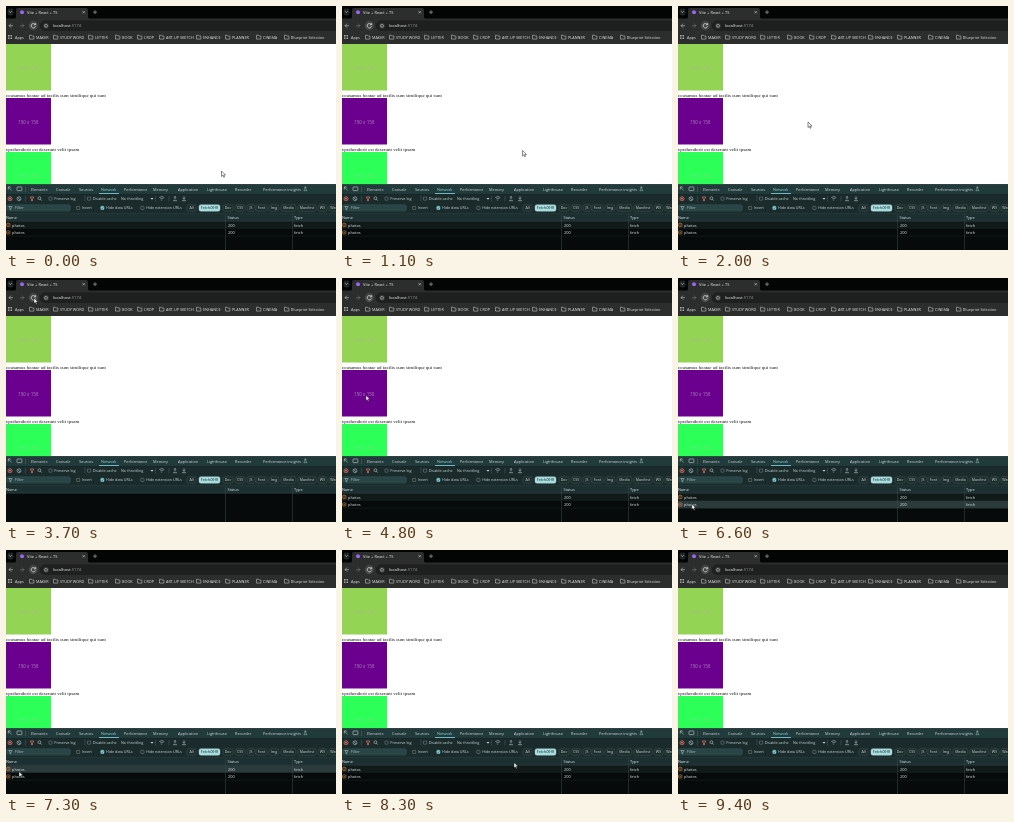
An HTML page that plays this animation: 330x244 px, repeating every 9500 ms.

```html
<!DOCTYPE html>
<html lang="en">
<head>
<meta charset="utf-8">
<title>Network panel</title>
<style>
html, body { margin: 0; width: 100%; height: 100%; overflow: hidden; background: #050808; }
svg { display: block; width: 330px; height: 244px; }
text { font-family: "Open Sans", "Noto Sans", sans-serif; white-space: pre; }
.serif { font-family: "Liberation Serif", serif; }
</style>
</head>
<body>
<svg id="stage" viewBox="0 0 330 244"></svg>
<script>
const NS = "http://www.w3.org/2000/svg";
const stage = document.getElementById("stage");
const LOOP = 9500, STEP = 100;

function add(tag, attrs, parent = stage) {
  const el = document.createElementNS(NS, tag);
  for (const k in attrs) el.setAttribute(k, attrs[k]);
  parent.appendChild(el);
  return el;
}
const rect = (x, y, width, height, fill, rx = 0, more = {}, p) =>
  add("rect", { x, y, width, height, fill, rx, ...more }, p);
const line = (d, stroke, w = 0.6, p) =>
  add("path", { d, stroke, "stroke-width": w, fill: "none" }, p);
const circle = (cx, cy, r, fill, more = {}) => add("circle", { cx, cy, r, fill, ...more });
function label(x, y, str, fill = "#dfe5e5", size = 3.9, more = {}, p = stage) {
  const el = add("text", { x, y, fill, "font-size": size, ...more }, p);
  el.textContent = str;
  return el;
}

function drawBrowser() {
  rect(0, 0, 330, 13, "#030505");
  rect(1.5, 2.5, 6, 7, "#202323", 2);
  line("M3.2 5.2l1.3 1.4 1.3-1.4", "#ddd");
  add("path", { d: "M8 13q2 0 2-2V4q0-2 2-2h68q2 0 2 2v7q0 2 2 2z", fill: "#2c2d2d" });
  circle(16, 6.3, 2, "#9a63f5");
  label(21, 7.9, "Vite + React + TS", "#eee", 4);
  line("M76.4 4.9l2.6 2.6m0-2.6l-2.6 2.6M87 6.2h4m-2-2v4", "#ccc", 0.55);

  rect(0, 12.5, 330, 25.5, "#2c2d2d");
  line("M7 19.7H3m2-2l-2 2 2 2", "#c8c8c8");
  line("M14 19.7h4m-2-2l2 2-2 2", "#777");
  circle(27.3, 19.7, 4.6, "#454747");
  line("M29.3 18.6a2.2 2.2 0 1 0 .2 1.8M29.6 17v1.8h-1.8", "#eee", 0.65);
  rect(34, 14.6, 300, 10.4, "#1e1f1f", 5);
  circle(40, 19.8, 2.9, "#363838");
  circle(40, 19.8, 1.5, "none", { stroke: "#ccc", "stroke-width": 0.5 });
  line("M40 19.6v1", "#ccc", 0.5);
  const url = label(47, 21.3, "localhost", "#f1f1f1", 4.2);
  const port = add("tspan", { fill: "#9b9e9e" }, url);
  port.textContent = ":5174";

  for (let i = 0; i < 9; i++)
    rect(2 + i % 3 * 1.5, 29 + Math.floor(i / 3) * 1.5, 0.9, 0.9, "#c3c6c6");
  label(9, 32.6, "Apps", "#e6e6e6", 3.8);
  const folders = [
    [30, "MAKER"], [54, "STUDY WORD"], [89, "LETTER"], [116, "BOOK"], [138, "CROP"],
    [160, "ART-UP SKETCH"], [197, "ENHANCE"], [226, "PLANNER"], [257, "CINEMA"],
    [285, "Blueprint Selection"]
  ];
  for (const [x, name] of folders) {
    line(`M${x - 6.5} 29.2h1.7l.7.8h2v3.1h-4.4z`, "#c9cccc", 0.55);
    label(x, 32.6, name, "#e6e6e6", 3.8);
  }
}

function drawPage() {
  rect(0, 38, 330, 140.5, "#fff");
  const tiles = [[38, "#94d454", "#aab58d"], [92, "#6b008e", "#b28abf"], [146, "#2cff58", "#73dc84"]];
  for (const [y, fill, ink] of tiles) {
    rect(0, y, 45, Math.min(46.5, 178.5 - y), fill);
    label(22.3, y + 25.5, "150 x 150", ink, 4.5, { "text-anchor": "middle" });
  }
  label(0, 90.6, "ccusamus beatae ad facilis cum similique qui sunt", "#111", 5, { class: "serif" });
  label(0, 144.6, "eprehenderit est deserunt velit ipsam", "#111", 5, { class: "serif" });
}

function check(x, y, str, on) {
  rect(x, y - 1.7, 3.2, 3.2, on ? "#7ed0d4" : "none", 0.6,
    { stroke: on ? "#7ed0d4" : "#839090", "stroke-width": 0.5 });
  if (on) line(`M${x + 0.7} ${y}l.7.7 1.2-1.5`, "#12292b", 0.5);
  label(x + 5.2, y + 1.4, str, "#ced8d8", 3.75);
}

function drawTools() {
  rect(0, 178.5, 330, 65.5, "#060a0a");
  rect(0, 178.5, 330, 9.7, "#213a3b");
  line("M2.3 181l3.2 3.2M2.3 183.5v-2.5h2.5", "#c3d2d2", 0.6);
  rect(11, 181, 4.8, 3.7, "none", 0.4, { stroke: "#c3d2d2", "stroke-width": 0.6 });
  line("M19.5 180.5v5.5", "#506667", 0.5);
  const tabs = [
    [25, "Elements"], [50, "Console"], [73, "Sources"], [95, "Network"], [118, "Performance"],
    [147, "Memory"], [172, "Application"], [201, "Lighthouse"], [229, "Recorder"],
    [257, "Performance insights"]
  ];
  for (const [x, name] of tabs)
    label(x, 184.7, name, name === "Network" ? "#8ce0e4" : "#d3dddd", 3.85);
  rect(93, 187.2, 20, 0.9, "#84d8dc");
  line("M298.3 181h2m-1.5 0v1.5l-1 2.2h3l-1-2.2V181", "#c3d2d2", 0.45);

  rect(0, 188.2, 330, 19.3, "#1b2b2c");
  circle(4, 192.7, 2, "none", { stroke: "#f0786e", "stroke-width": 0.7 });
  circle(4, 192.7, 0.9, "#f0786e");
  circle(13, 192.7, 1.9, "none", { stroke: "#bfcaca", "stroke-width": 0.6 });
  line("M11.7 191.4l2.6 2.6", "#bfcaca", 0.6);
  line("M19.5 190v5.5M79 190v5.5M149.5 190v5.5M163 190v5.5", "#4c6061", 0.5);
  line("M24 191h4l-1.5 1.9v2h-1v-2z", "#f0786e", 0.65);
  circle(33.4, 192.2, 1.4, "none", { stroke: "#bfcaca", "stroke-width": 0.6 });
  line("M34.4 193.2l1.4 1.4", "#bfcaca", 0.6);
  check(43, 192.7, "Preserve log");
  check(81.5, 192.7, "Disable cache");
  label(115, 194.1, "No throttling", "#ced8d8", 3.75);
  add("path", { d: "M144.5 191.9h3l-1.5 1.8z", fill: "#c3d2d2" });
  line("M153.3 191.5q2.5-2 5 0m-4 1.3q1.5-1 3 0m-2.2 1.3h1", "#bfcaca", 0.55);
  line("M169 193.5v-3m-1.3 1.2l1.3-1.2 1.3 1.2M167 194.7h4", "#bfcaca", 0.6);
  line("M178 190.3v3m-1.3-1.2l1.3 1.2 1.3-1.2M176 194.7h4", "#bfcaca", 0.6);

  rect(0, 198.2, 65, 7.4, "#294546", 3);
  line("M2.7 200.5h3.4l-1.3 1.6v1.5H4v-1.5z", "#bed0d0", 0.5);
  label(9, 203.4, "Filter", "#b6c7c7", 3.75);
  check(70.5, 202, "Invert");
  check(94.8, 202, "Hide data URLs", true);
  check(134.8, 202, "Hide extension URLs");
  const kinds = [
    [181, 9, "All"], [193, 21, "Fetch/XHR"], [217, 10, "Doc"], [229, 10, "CSS"], [241, 8, "JS"],
    [250, 11, "Font"], [263, 10, "Img"], [275, 15, "Media"], [292, 18, "Manifest"],
    [312, 9, "WS"], [323, 13, "Wasm"]
  ];
  for (const [x, w, name] of kinds) {
    const on = name === "Fetch/XHR";
    rect(x, 198.8, w, 6.4, on ? "#a9dcdf" : "none", 1.8,
      { stroke: on ? "#a9dcdf" : "#526768", "stroke-width": 0.4 });
    label(x + w / 2, 203.3, name, on ? "#102a2c" : "#dbe4e4", 3.6, { "text-anchor": "middle" });
  }
}

function drawTable() {
  const rows = [0, 1].map(i => {
    const y = 215.3 + i * 7.5;
    const g = add("g", {});
    const back = rect(0, y, 330, 7.5, "#111919", 0, {}, g);
    rect(0.7, y + 2.1, 3.2, 3.2, "none", 0.6, { stroke: "#e88a4a", "stroke-width": 0.6 }, g);
    line(`M1.5 ${y + 3.7}h1.6`, "#e88a4a", 0.5, g);
    [[6, "photos"], [222, "200"], [288, "fetch"]].forEach(([x, s]) =>
      label(x, y + 5.2, s, "#e2e8e8", 3.9, {}, g));
    line(`M0 ${y + 7.4}H330`, "#293737", 0.3, g);
    return { g, back };
  });
  rect(0, 207.5, 330, 7.8, "#1d3031");
  line("M0 207.4H330M0 215.2H330", "#405556", 0.4);
  [[0, "Name"], [221.5, "Status"], [288, "Type"]].forEach(([x, s]) => label(x, 212.9, s));
  line("M219.5 207.5V244M286.5 207.5V244", "#3b4d4e", 0.5);
  return rows;
}

drawBrowser();
drawPage();
drawTools();
const rows = drawTable();
const pointer = add("path", {
  d: "M0 0V5.5L1.3 4.3 2.2 6.3 3.1 5.9 2.2 4H4z",
  fill: "#fff", stroke: "#111", "stroke-width": 0.5
});

// time, x, y of the pointer tip
const path = [
  [0, 215.5, 165], [400, 215, 164], [2000, 130, 116], [2300, 126, 113], [3400, 28, 20],
  [4200, 28, 20], [5400, 19.8, 214.6], [5700, 19.8, 214.6], [6400, 14, 226], [7000, 13, 226],
  [7300, 13, 221.5], [7500, 14, 221], [8300, 172, 212.5], [8900, 335, 204], [9500, 335, 204]
];

function pointerAt(t) {
  const i = path.findIndex(p => p[0] > t);
  const [t0, x0, y0] = path[i - 1], [t1, x1, y1] = path[i];
  const u = (t - t0) / (t1 - t0), e = u * u * (3 - 2 * u);
  return [x0 + (x1 - x0) * e, y0 + (y1 - y0) * e];
}

function draw(now) {
  const t = Math.floor(now % LOOP / STEP) * STEP;
  const [x, y] = pointerAt(t);
  pointer.setAttribute("transform", `translate(${x} ${y})`);
  pointer.setAttribute("visibility", x < 330 ? "visible" : "hidden");
  rows.forEach(({ g, back }, i) => {
    const top = 214.5 + i * 8;
    const hover = x < 330 && y >= top && y < top + 8;
    const loading = t >= 3600 && t < 4600 + i * 100;
    g.setAttribute("visibility", loading ? "hidden" : "visible");
    back.setAttribute("fill", hover ? "#2b3a3b" : i ? "#060a0a" : "#111919");
  });
}

const start = performance.now();
function tick() {
  draw(performance.now() - start);
  requestAnimationFrame(tick);
}
draw(0);
requestAnimationFrame(tick);
</script>
</body>
</html>
```
